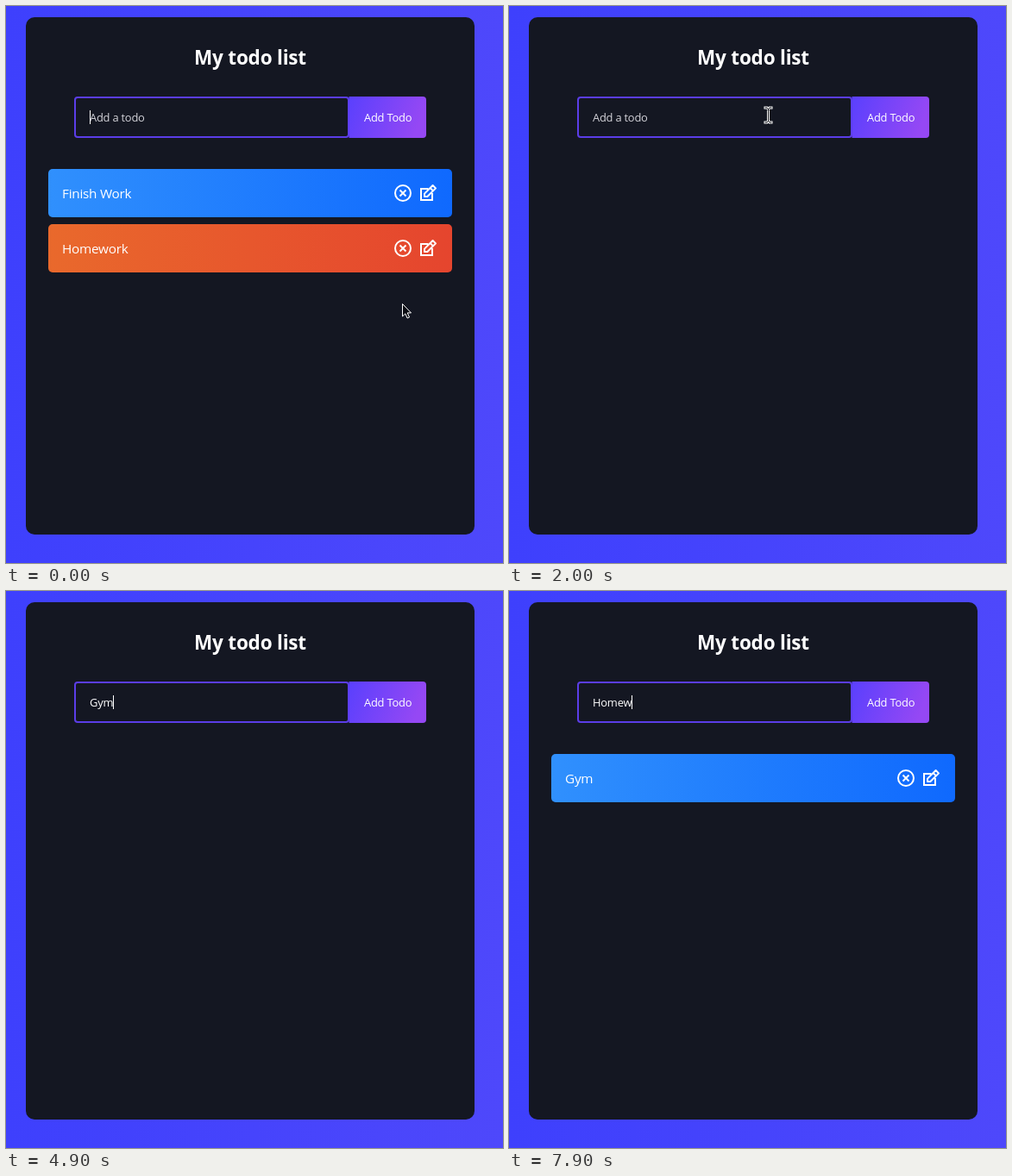
Write an HTML page that moves like this. It is 576 px wide and 646 px high and loops after 8 s.

```html
<!DOCTYPE html>
<html lang="en">
<head>
<meta charset="utf-8">
<title>Todo list</title>
<style>
  html, body { margin: 0; width: 100%; height: 100%; overflow: hidden; background: #4541fc; }
  svg { display: block; }
  text { font-family: "Open Sans", "Noto Sans", sans-serif; font-weight: 500; fill: #fff; }
  .title { font-size: 22.5px; font-weight: 700; letter-spacing: -.2px; text-anchor: middle; }
  .field { font-size: 12.9px; letter-spacing: -.22px; }
  .item { font-size: 15.3px; letter-spacing: -.25px; }
  .icon { fill: none; stroke: #fff; stroke-width: 2; }
  .hint { fill: #d3d3d9; }
</style>
</head>
<body>
<svg width="576" height="646" viewBox="0 0 576 646">
  <defs>
    <linearGradient id="page"><stop stop-color="#3e40fd"/><stop offset="1" stop-color="#4e48fb"/></linearGradient>
    <linearGradient id="button" y2=".2"><stop stop-color="#5a40fd"/><stop offset="1" stop-color="#9548f4"/></linearGradient>
    <linearGradient id="blue"><stop stop-color="#3090fd"/><stop offset="1" stop-color="#0f69fe"/></linearGradient>
    <linearGradient id="orange"><stop stop-color="#e9692c"/><stop offset="1" stop-color="#e5452e"/></linearGradient>
    <g id="icons" class="icon">
      <g transform="translate(460 217)">
        <circle r="9"/>
        <path d="M-3.5-3.5 3.5 3.5M3.5-3.5-3.5 3.5"/>
      </g>
      <g transform="translate(477 205)">
        <path d="M12.5 7H4V20H17V12"/>
        <path d="M8 16V12.6L17.6 3 21 6.4 11.4 16Z" stroke-linejoin="round"/>
        <path d="M14.6 6 18 9.4"/>
      </g>
    </g>
  </defs>

  <rect width="576" height="646" fill="url(#page)"/>
  <rect x="23" y="13" width="520" height="600" rx="10" fill="#141722"/>
  <text class="title" x="283" y="68">My todo list</text>

  <rect x="80" y="106" width="317" height="46" rx="3" fill="none" stroke="#5b3de8" stroke-width="2"/>
  <path d="M397.5 105H483a4 4 0 0 1 4 4V149a4 4 0 0 1-4 4H397.5Z" fill="url(#button)"/>
  <text class="field" x="415" y="134">Add Todo</text>
  <text class="field" id="entry" x="97" y="134"></text>
  <rect id="caret" y="121" width="1" height="16" fill="#fff"/>

  <g id="first">
    <rect x="49" y="189" width="468" height="56" rx="5" fill="url(#blue)"/>
    <text class="item" id="label" x="65" y="223"></text>
    <use href="#icons"/>
  </g>
  <g id="second">
    <rect x="49" y="253" width="468" height="56" rx="5" fill="url(#orange)"/>
    <text class="item" x="65" y="287">Homework</text>
    <use href="#icons" y="64"/>
  </g>

  <path id="arrow" d="M0 0V14.5L3.3 11.4 5.6 16.5 8 15.5 5.7 10.4H10Z" fill="#0b0c12" stroke="#fff"/>
  <g id="beam" fill="none" stroke-linecap="square">
    <path d="M-3.5-8.5H-1.5L0-7 1.5-8.5H3.5M0-7V7M-3.5 8.5H-1.5L0 7 1.5 8.5H3.5" stroke="#fff" stroke-width="3"/>
    <path d="M-3.5-8.5H-1.5L0-7 1.5-8.5H3.5M0-7V7M-3.5 8.5H-1.5L0 7 1.5 8.5H3.5" stroke="#0b0c12"/>
  </g>
</svg>
<script>
const LOOP = 8000, STEP = 100, BLINK = 530;
const $ = id => document.getElementById(id);

// [time, text in the field]
const keys = [
  [0, ""], [3900, "G"], [4100, "Gy"], [4400, "Gym"], [5000, ""],
  [5500, "H"], [5700, "Ho"], [5900, "Hom"], [6200, "Home"], [6400, "Homewo"],
  [6600, "Homewor"], [6800, "Homework"], [7400, "Homewor"], [7500, "Homewo"], [7600, "Homew"]
];
// [time, first item, second item shown]
const lists = [[0, "Finish Work", true], [400, "Finish Work", false], [1000, "", false], [5000, "Gym", false]];
// [time, x, y]
const mouse = [[0, 459.5, 345.5], [400, 460.5, 286.5], [600, 460.5, 286.5], [900, 460.5, 220.5],
  [1200, 460.5, 220.5], [1700, 300.5, 126.5]];

const latest = (table, t) => table.filter(row => row[0] <= t).pop();
const show = (el, on) => el.setAttribute("visibility", on ? "visible" : "hidden");
const ease = p => p * p * (3 - 2 * p);

function mouseAt(t) {
  const a = latest(mouse, t);
  const b = mouse[mouse.indexOf(a) + 1] || a;
  const p = a === b ? 0 : ease((t - a[0]) / (b[0] - a[0]));
  return [a[1] + (b[1] - a[1]) * p, a[2] + (b[2] - a[2]) * p];
}

function draw(t) {
  const [keyTime, typed] = latest(keys, t);
  const entry = $("entry");
  entry.textContent = typed || "Add a todo";
  entry.classList.toggle("hint", !typed);
  const width = typed ? entry.getComputedTextLength() : 0;
  $("caret").setAttribute("x", 97 + Math.floor(width));
  show($("caret"), (t - keyTime) % (2 * BLINK) < BLINK);

  const [, first, second] = latest(lists, t);
  $("label").textContent = first;
  show($("first"), first);
  show($("second"), second);

  const [x, y] = mouseAt(t);
  const inField = x < 398 && y < 153;
  for (const id of ["arrow", "beam"]) $(id).setAttribute("transform", `translate(${x} ${y})`);
  show($("arrow"), !inField);
  show($("beam"), inField && t < keys[1][0]);
}

const start = performance.now();
function tick() {
  const t = (performance.now() - start) % LOOP;
  draw(Math.floor(t / STEP) * STEP);
  requestAnimationFrame(tick);
}
tick();
</script>
</body>
</html>
```
